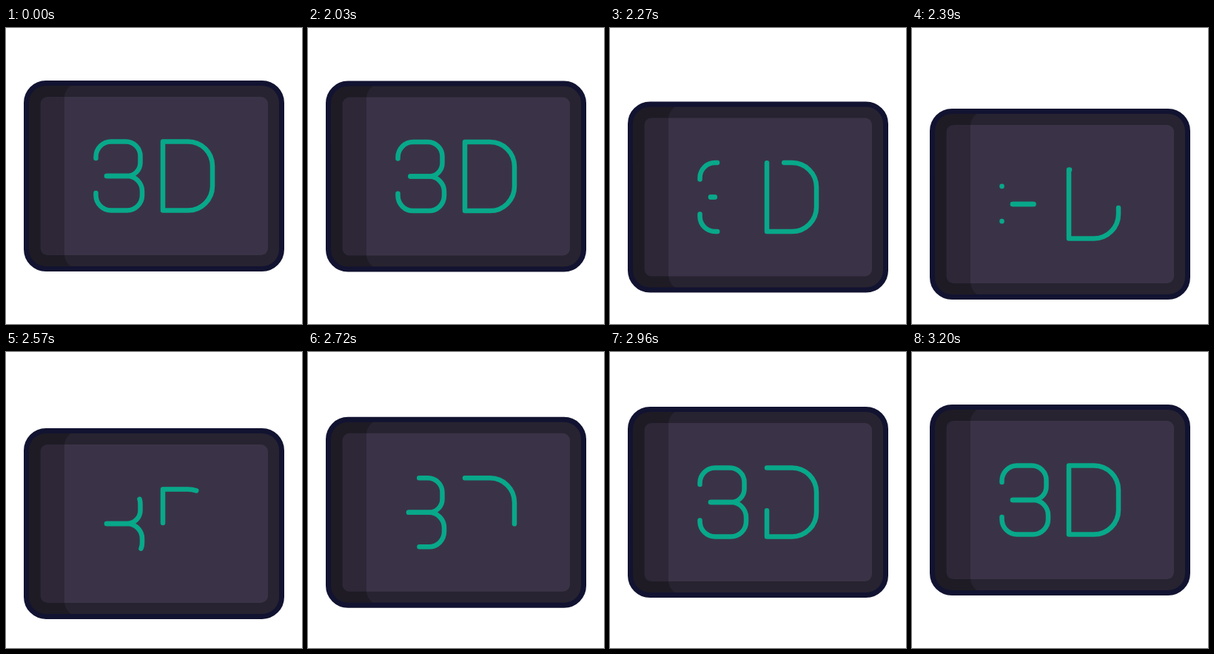
Write an HTML page that moves like this. It is 400 px wide and 400 px high and loops after 3.23 s.

```html
<!DOCTYPE html>
<html lang="en">
<head>
<meta charset="utf-8">
<title>3D panel</title>
<style>
  html, body { margin: 0; width: 100%; height: 100%; overflow: hidden; background: #fff; }
  svg { display: block; width: 100%; height: 100%; }
  .line { fill: none; stroke: #08a88a; stroke-width: 6.5; stroke-linecap: round; stroke-linejoin: round; }
</style>
</head>
<body>
<svg viewBox="0 0 400 400">
  <g id="panel">
    <rect x="27.5" y="74.5" width="345" height="251" rx="26.5" fill="#272330"/>
    <rect x="46.5" y="93" width="307.5" height="214" rx="9.5" fill="#3a3347"/>
    <path opacity=".23" d="M54 74.5H99A20 20 0 0 0 79 94.5V305.5A20 20 0 0 0 99 325.5H54A26.5 26.5 0 0 1 27.5 299V101A26.5 26.5 0 0 1 54 74.5Z"/>
    <rect x="27.5" y="74.5" width="345" height="251" rx="26.5" fill="none" stroke="#121331" stroke-width="7"/>
    <path class="line three" pathLength="100" d="M136 200H163.5A18 18 0 0 0 181.5 182V173A19.5 19.5 0 0 0 162 153.5H142A20.5 20.5 0 0 0 121.5 174V176"/>
    <path class="line three" pathLength="100" d="M136 200H163.5A20.5 20.5 0 0 1 184 220.5V226A20.5 20.5 0 0 1 163.5 246.5H142A20.5 20.5 0 0 1 121.5 226V223"/>
    <path class="line dee" pathLength="100" d="M212 153.5H246A33 33 0 0 1 279 186.5V213.5A33 33 0 0 1 246 246.5H212Z"/>
  </g>
</svg>
<script>
  const LOOP = 3230, STEP = 30, DROP = 38;
  const panel = document.getElementById('panel');

  // Progress from time a to b along cubic-bezier(x1, 0, x2, 1).
  function ease(t, a, b, x1 = 1 / 3, x2 = 2 / 3) {
    const u = Math.min(1, Math.max(0, (t - a) / (b - a)));
    if (u === 0 || u === 1) return u;
    let lo = 0, hi = 1, s;
    for (let i = 0; i < 24; i++) {
      s = (lo + hi) / 2;
      const r = 1 - s;
      if (3 * r * r * s * x1 + 3 * r * s * s * x2 + s ** 3 < u) lo = s; else hi = s;
    }
    return s * s * (3 - 2 * s);
  }

  // Erase each path from its start while the new stroke follows behind.
  function trim(selector, erased, redrawn) {
    const shown = Math.max(0, 100 * (1 + redrawn - erased) - 0.02);
    for (const path of document.querySelectorAll(selector)) {
      path.style.strokeDasharray = `${shown} ${100 - shown}`;
      path.style.strokeDashoffset = -100 * erased;
    }
  }

  function draw() {
    const now = performance.now() % LOOP;
    const t = Math.floor((now - 20) / STEP) * STEP + 20;
    const y = DROP * (ease(t, 2000, 2400) - ease(t, 2400, 3200, 0.36, 0.3));
    panel.setAttribute('transform', `translate(0 ${y})`);
    trim('.three', ease(t, 2000, 2400), ease(t, 2200, 3000, 0.22, 0.73));
    trim('.dee', ease(t, 2180, 2700), ease(t, 2360, 3200));
    requestAnimationFrame(draw);
  }
  draw();
</script>
</body>
</html>
```
